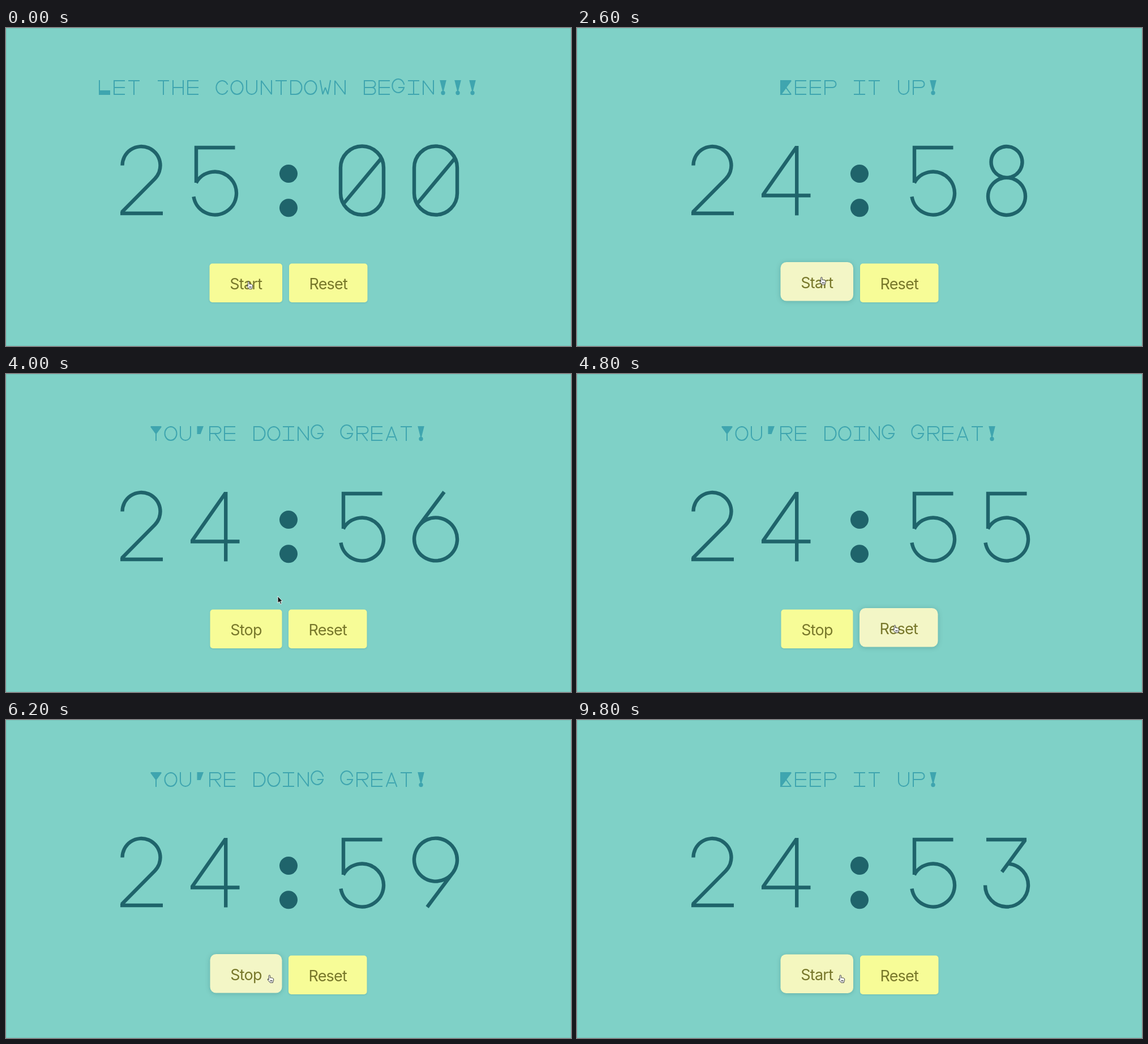
Animation of 998 by 561 pixels, one loop 10 s. Source, as an HTML page:

```html
<!DOCTYPE html>
<html lang="en">
<head>
<meta charset="utf-8">
<title>Countdown timer</title>
<style>
  html, body { margin: 0; width: 100%; height: 100%; overflow: hidden; background: #7fd1c7; }
  svg { position: absolute; left: 0; top: 0; display: block; cursor: inherit; }
  #title, #clock { fill: none; stroke: currentColor; }
  #title { color: #3fa5af; stroke-width: 2; stroke-linecap: square; stroke-miterlimit: 2; }
  #title .solid { fill: currentColor; }
  #clock { color: #1f646b; stroke-width: 6.4; }
  #clock .dots { stroke-width: 32; stroke-linecap: round; }
  text {
    font: 400 27px Inter, Roboto, sans-serif; font-optical-sizing: none;
    letter-spacing: -.8px; text-anchor: middle; fill: #77772a;
  }
</style>
</head>
<body>
<svg width="998" height="561" viewBox="0 0 998 561">
  <rect x=".5" y=".5" width="997" height="560" fill="none" stroke="#000" stroke-opacity=".06"/>
  <g id="title" role="img"></g>
  <g id="clock" role="img"></g>
  <g id="toggle"><rect y="415.5" height="68.5"/><text y="461"></text></g>
  <g id="reset"><rect y="415.5" height="68.5"/><text y="461">Reset</text></g>
  <g id="cursor">
    <path id="arrow" d="M0 0V12L3 9.6L5 14L7 13L5 9H8.5Z" fill="#111" stroke="#fff" stroke-width=".9"/>
    <path id="hand" transform="scale(.86)" fill="#fff" stroke="#222" stroke-linejoin="round"
      d="M-1.5 9V1a1.4 1.4 0 0 1 2.8 0V5q5-.6 7 2V10q0 2-1.4 3.5V15H1.2L-2.6 10.6Q-4.6 8-3.6 7.4T-1.5 9ZM1.6 9.6v3M3.5 9.6v3M5.4 9.6v3"/>
  </g>
</svg>
<script>
const LOOP = 10000, FRAME = 200, SECOND = 600, FULL = 25 * 60;

// Letters are traced over a 5 x 5 grid named a..y, row by row.
// Between two points: ")" and "(" bulge right and left, "_" hangs a cup,
// "@" goes the long way round. "#" fills the outline. Capitals are ornamental.
const LETTERS = {
  a: 'ucy qs', b: 'ua)k)u', c: 'j@t', d: 'ua)u', e: 'eauy ko', g: 'j@om',
  h: 'au ey ko', i: 'ae cw uy', n: 'uaye', o: 'c)w(c', p: 'ua)k', r: 'ua)k my',
  t: 'ae cw', u: 'a_e', w: 'avmxe', y: 'ame mw',
  K: '#aeu umyu', L: 'au #ptyu', R: 'a)kyua', Y: '#aem mw',
  "'": '#bdml', '!': '#bdr', '?': '#f)rml(f'
};
const WIDE = 10.5;

function point(c) {
  const i = c.charCodeAt(0) - 97;
  return [(i % 5 - 2) * 4.5, (Math.floor(i / 5) - 2) * 6];
}

function trace(word) {
  let path = '', mode = 'M', last;
  for (const c of word) {
    if (!/[a-y]/.test(c)) { mode = c; continue; }
    const [x, y] = point(c);
    if (mode === ')' || mode === '(') {
      const side = mode === ')' ? 1 : -1, ry = Math.abs(y - last[1]) / 2, rx = Math.min(ry, WIDE);
      path += `H${side * (WIDE - rx)}A${rx} ${ry} 0 0 1 ${side * (WIDE - rx)} ${y}H${x}`;
    } else if (mode === '_') path += `V3A9 9 0 0 0 ${x} 3V${y}`;
    else if (mode === '@') path += `A${WIDE} 12 0 1 0 ${x} ${y}`;
    else path += `${mode}${x} ${y}`;
    mode = 'L';
    last = [x, y];
  }
  return path;
}

function letter(c) {
  const parts = (LETTERS[c] || '').split(' ').map(w =>
    w[0] === '#' ? `<path class="solid" d="${trace(w.slice(1))}Z"/>` : `<path d="${trace(w)}"/>`);
  if (c === '!') parts.push('<circle class="solid" cy="9.5" r="2.7"/>');
  if (c === '?') parts.push('<circle cy="10" r="2.3"/>');
  return parts.join('');
}

// Digits are circular arcs, angles in degrees, joined by straight strokes.
const HIGH = 246.5, LOW = 291.5;
function arc(y, from, to, r = 38) {
  const at = deg => {
    const a = deg * Math.PI / 180;
    return `${(r * Math.cos(a)).toFixed(2)} ${(y + r * Math.sin(a)).toFixed(2)}`;
  };
  return `M${at(from)}A${r} ${r} 0 ${to - from > 180 ? 1 : 0} 1 ${at(to)}`;
}
const ring = (y, r) => arc(y, 0, 359.9, r) + 'Z';

const DIGITS = {
  0: arc(HIGH, 180, 360) + `V${LOW}` + arc(LOW, 0, 180) + `V${HIGH}M-32 309L33 231`,
  2: arc(242.5, 180, 405, 33.5) + 'L-34.5 325M-37 327H38',
  3: arc(LOW, -85, 180) + 'M-36 211H35M32.5 212L-8.5 268',
  4: 'M19.2 330.5V208M19 209.5L-40.5 294.5M-43 295.5H43.5',
  5: arc(LOW, -151, 171) + 'M35.5 211H-33V273',
  6: arc(LOW, 217, 576) + 'L15 208',
  7: 'M-41 211H40M37.5 211L-20 330',
  8: ring(236.5, 27.5) + ring(297, 33),
  9: arc(HIGH, 37, 396) + 'L-15 330',
  ':': 'M0 257h.01M0 317.3h.01'
};
const digit = c => `<path class="${c === ':' ? 'dots' : ''}" d="${DIGITS[c]}"/>`;

const CLICKS = [
  [600, 'toggle'], [2390, 'toggle'], [2800, 'toggle'],
  [5000, 'reset'], [5600, 'toggle'], [9800, 'toggle']
];

// Pointer moves: leave, arrive, x, y
const MOVES = [
  [0, 0, 428.5, 447.5], [800, 1400, 414.5, 368.5], [2200, 2400, 432, 440],
  [2800, 3000, 445, 400], [3200, 3400, 440.5, 430.5], [3400, 4000, 480, 392],
  [4400, 4800, 561.5, 443.5], [5200, 5400, 465.5, 450.5]
];

const el = id => document.getElementById(id);
const mix = (a, b, k) => a + (b - a) * k;

function pointer(t) {
  let x = 0, y = 0;
  for (const [leave, arrive, toX, toY] of MOVES) {
    if (t < leave) break;
    const k = arrive > leave ? Math.min(1, (t - leave) / (arrive - leave)) : 1;
    const ease = k * k * (3 - 2 * k);
    x = mix(x, toX, ease);
    y = mix(y, toY, ease);
  }
  return [x, y];
}

function under(t) {
  const [x, y] = pointer(t);
  if (y < 415 || y > 484 || x < 360 || x > 638) return '';
  return x < 488 ? 'toggle' : x > 499 ? 'reset' : '';
}

// The lift follows the share of the last 200 ms spent hovering unpressed.
function lift(id, t) {
  const steps = 20;
  let n = 0;
  for (let i = 0; i < steps; i++) {
    const s = t - i * 200 / steps;
    const pressed = CLICKS.some(([at]) => s > at - 140 && s < at - 100);
    if (s > 0 && !pressed && under(s) === id) n++;
  }
  return n / steps;
}

function timer(t) {
  let left = FULL, since = null, message = 'Let the countdown begin!!!';
  const spent = now => since === null ? 0 : Math.floor((now - since) / SECOND);
  for (const [at, id] of CLICKS) {
    if (at > t) break;
    left = id === 'reset' ? FULL : left - spent(at);
    if (id === 'reset') message = 'Ready to go another round?';
    else message = since === null ? "You're doing great!" : 'Keep it up!';
    since = id === 'toggle' && since === null ? at : null;
  }
  return { message, left: left - spent(t), running: since !== null };
}

function write(node, text, glyph, cell, y) {
  if (node.getAttribute('aria-label') === text) return;
  node.setAttribute('aria-label', text);
  const start = 499 - (text.length - 1) * cell / 2;
  node.innerHTML = [...text].map((c, i) =>
    `<g transform="translate(${start + i * cell} ${y})">${glyph(c)}</g>`).join('');
}

function paintButton(id, x, width, t) {
  const h = lift(id, t), [box, label] = el(id).children;
  el(id).setAttribute('transform', `translate(0 ${-2.5 * h})`);
  box.setAttribute('x', x);
  box.setAttribute('width', width);
  box.setAttribute('rx', mix(5, 10.5, h));
  box.style.fill = `rgb(${mix(247, 243, h)},${mix(252, 246, h)},${mix(151, 198, h)})`;
  box.style.filter = `drop-shadow(0 1px ${mix(1.5, 4, h)}px rgba(0,50,50,${mix(.14, .22, h)}))`;
  label.setAttribute('x', x + width / 2);
}

function draw(t) {
  const { message, left, running } = timer(t);
  const clock = [Math.floor(left / 60), left % 60].map(n => String(n).padStart(2, '0')).join(':');
  write(el('title'), message, letter, 26, 105);
  write(el('clock'), clock, digit, 130, 0);

  el('toggle').lastElementChild.textContent = running ? 'Stop' : 'Start';
  paintButton('toggle', running ? 360.5 : 359.5, running ? 127 : 128.5, t);
  paintButton('reset', running ? 499 : 500, 138.5, t);

  const over = under(t) !== '';
  el('cursor').setAttribute('transform', `translate(${pointer(t).join(' ')})`);
  el('hand').style.display = over ? '' : 'none';
  el('arrow').style.display = over ? 'none' : '';
}

// The picture moves on five times a second.
const begin = performance.now();
let shown = -1;
function tick() {
  const t = Math.floor((performance.now() - begin) % LOOP / FRAME) * FRAME;
  if (t !== shown) draw(shown = t);
  requestAnimationFrame(tick);
}
tick();
</script>
</body>
</html>
```
